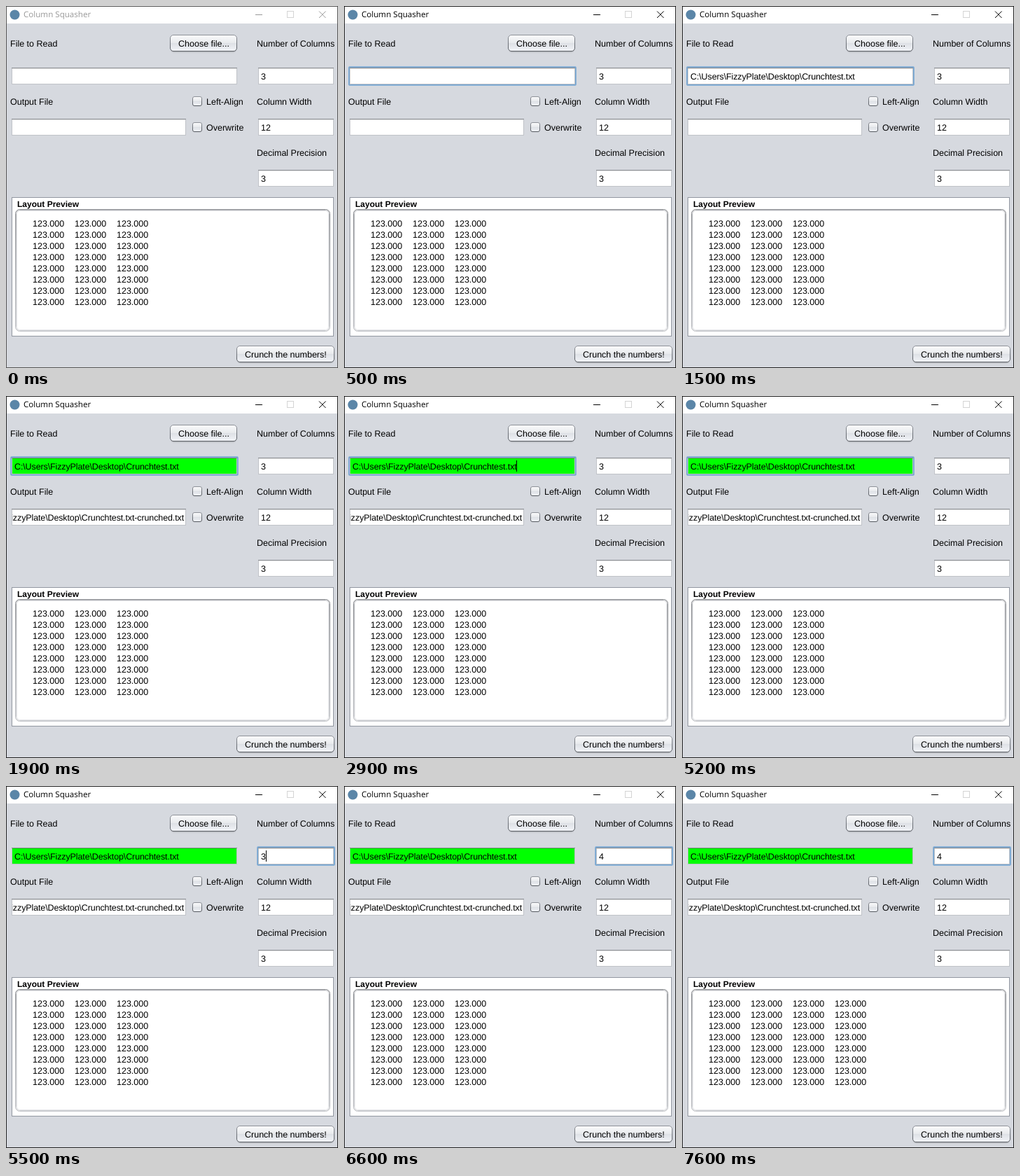
An HTML page for the animation above (8 s loop, 474x517 px).

```html
<!DOCTYPE html>
<html lang="en">
<head>
<meta charset="utf-8">
<title>Column Squasher</title>
<style>
html, body { margin: 0; width: 100%; height: 100%; overflow: hidden; background: #d6d9df; }
svg { display: block; }
text {
  font: 12.5px "Liberation Sans", Arial, sans-serif;
  text-rendering: geometricPrecision;
  white-space: pre;
}
.path { letter-spacing: -.12px; }
.heading { font-weight: bold; font-size: 12px; }
#title { font: 11.6px "Open Sans", sans-serif; }
</style>
</head>
<body>
<svg id="stage" width="474" height="517" viewBox="0 0 474 517">
  <defs>
    <linearGradient id="face" x2="0" y2="1">
      <stop offset="0" stop-color="#fbfbfc"/>
      <stop offset=".48" stop-color="#e8eaed"/>
      <stop offset=".52" stop-color="#dee1e6"/>
      <stop offset="1" stop-color="#f2f4f8"/>
    </linearGradient>
    <linearGradient id="edge" x2="0" y2="1">
      <stop offset="0" stop-color="#8e9299"/>
      <stop offset="1" stop-color="#55595f"/>
    </linearGradient>
    <linearGradient id="paneEdge" x2="0" y2="1">
      <stop offset="0" stop-color="#96989c"/>
      <stop offset="1" stop-color="#c2c4c8"/>
    </linearGradient>
    <clipPath id="outputClip"><rect x="9" y="162" width="246" height="22"/></clipPath>
  </defs>
</svg>
<script>
const LOOP = 8000;
const stage = document.getElementById("stage");
const folder = "C:\\Users\\FizzyPlate\\Desktop\\";

const rect = (x, y, w, h, fill, extra = "") =>
  `<rect x="${x}" y="${y}" width="${w}" height="${h}" fill="${fill}" ${extra}/>`;
const label = (x, y, string, extra = "") => `<text x="${x}" y="${y}" ${extra}>${string}</text>`;
const outline = (x, y, w, h, stroke, extra = "") =>
  rect(x + .5, y + .5, w - 1, h - 1, "none", `stroke="${stroke}" ${extra}`);

const field = (x, y, w, id = "") =>
  rect(x, y, w, 24, "#fff", id && `id="${id}"`) +
  outline(x, y, w, 24, "#c0c3c8") +
  rect(x, y, w, 1, "#8d9095") +
  rect(x + 1, y + 1, w - 2, 1, "#000", 'opacity=".12"');

const ring = (x, y, w, id) =>
  `<g id="${id}">` + outline(x - 1, y - 1, w + 2, 26, "#73a4d1") +
  outline(x - 2, y - 2, w + 4, 28, "#8fb4d7", 'rx="1.5"') + "</g>";

const button = (x, y, w, string) =>
  rect(x + 1, y + 2, w - 2, 24, "#000", 'rx="5" opacity=".09"') +
  rect(x + .5, y + .5, w - 1, 23, "url(#face)", 'rx="4.5" stroke="url(#edge)"') +
  label(x + 12, y + 17, string);

const checkbox = (y, string, id) =>
  rect(266.5, y + .5, 13, 13, "url(#face)", `id="${id}" rx="2.5" stroke="url(#edge)"`) +
  label(286, y + 12, string);

const previewRows = Array.from({ length: 8 }, (_, row) =>
  [0, 1, 2, 3].map(col =>
    label(38 + col * 60, 315 + row * 16, "123.000", col === 3 ? 'class="extra"' : "")).join("")).join("");

stage.innerHTML += [
  rect(0, 0, 474, 517, "#d6d9df"),
  rect(0, 0, 474, 25, "#fff"),
  '<circle cx="12.5" cy="12.5" r="7" fill="#5b86a8"/>',
  label(25, 16, "Column Squasher", 'id="title"'),
  '<path id="controls" fill="none" d="M356 12.5h10M447 7.5l9.5 9.5m0 -9.5l-9.5 9.5"/>',
  outline(401, 7, 10, 10, "#d4d4d4"),
  outline(0, 0, 474, 517, "#222", 'id="frame"'),

  label(6, 58, "File to Read"),
  label(6, 141, "Output File"),
  label(358, 58, "Number of Columns"),
  label(358, 141, "Column Width"),
  label(358, 214, "Decimal Precision"),
  button(234, 41, 96, "Choose file..."),
  button(329, 485, 140, "Crunch the numbers!"),
  checkbox(129, "Left-Align", "leftAlign"),
  checkbox(166, "Overwrite", "overwrite"),

  field(8, 88, 322, "inputFill"),
  field(8, 161, 249),
  field(360, 88, 108),
  field(360, 161, 108),
  field(360, 234, 108),
  ring(8, 88, 322, "inputRing"),
  ring(360, 88, 108, "columnsRing"),
  label(12, 105, folder + "Crunchtest.txt", 'id="inputText" class="path"'),
  '<g id="outputText" clip-path="url(#outputClip)">' +
    label(254, 178, folder + "Crunchtest.txt-crunched.txt", 'class="path" text-anchor="end"') + "</g>",
  label(364, 105, "3", 'id="columnsText"'),
  label(364, 178, "12"),
  label(364, 251, "3"),
  rect(246, 92, 1, 16, "#000", 'id="caret"'),

  rect(8.5, 273.5, 459, 198, "#fff", 'stroke="#9297a1"'),
  label(16, 287, "Layout Preview", 'class="heading"'),
  rect(13.5, 290.5, 449, 174, "#fff", 'rx="6" stroke="url(#paneEdge)"'),
  outline(14, 291, 448, 173, "url(#paneEdge)", 'rx="5" opacity=".75"'),
  outline(15, 292, 446, 171, "#e4e5e8", 'rx="4"'),
  previewRows
].join("");

const el = id => document.getElementById(id);
const show = (node, visible) => node.setAttribute("visibility", visible ? "visible" : "hidden");
const within = (t, spans) => spans.some(([from, to]) => t >= from && t < to);

const inputCaret = [[1000, 1500], [2000, 2400], [2900, 3400], [3800, 4300], [4700, 5200]];
const columnsCaret = [[5500, 6000], [6100, 6600], [7100, 7500]];
const extraColumn = document.querySelectorAll(".extra");

function draw(t) {
  const active = t >= 500;
  const inColumns = t >= 5500;
  const erased = t >= 6100 && t < 6200;

  el("title").setAttribute("fill", active ? "#000" : "#999");
  el("controls").setAttribute("stroke", active ? "#000" : "#999");
  el("frame").setAttribute("stroke", active ? "#222" : "#555");
  show(el("inputRing"), active && !inColumns);
  show(el("columnsRing"), inColumns);

  show(el("inputText"), t >= 900);
  el("inputFill").setAttribute("fill", t >= 1900 ? "#0f0" : "#fff");
  show(el("outputText"), t >= 1900);
  el("leftAlign").setAttribute("fill", t >= 3500 && t < 3600 ? "#f8f9fb" : "url(#face)");

  el("columnsText").textContent = erased ? "" : t < 6100 ? "3" : "4";
  el("caret").setAttribute("x", !inColumns ? 246 : erased ? 364 : 371);
  show(el("caret"), within(t, inColumns ? columnsCaret : inputCaret));
  extraColumn.forEach(node => show(node, t >= 7600));
}

const start = performance.now();
function tick() {
  draw((performance.now() - start) % LOOP);
  requestAnimationFrame(tick);
}
tick();
</script>
</body>
</html>
```
